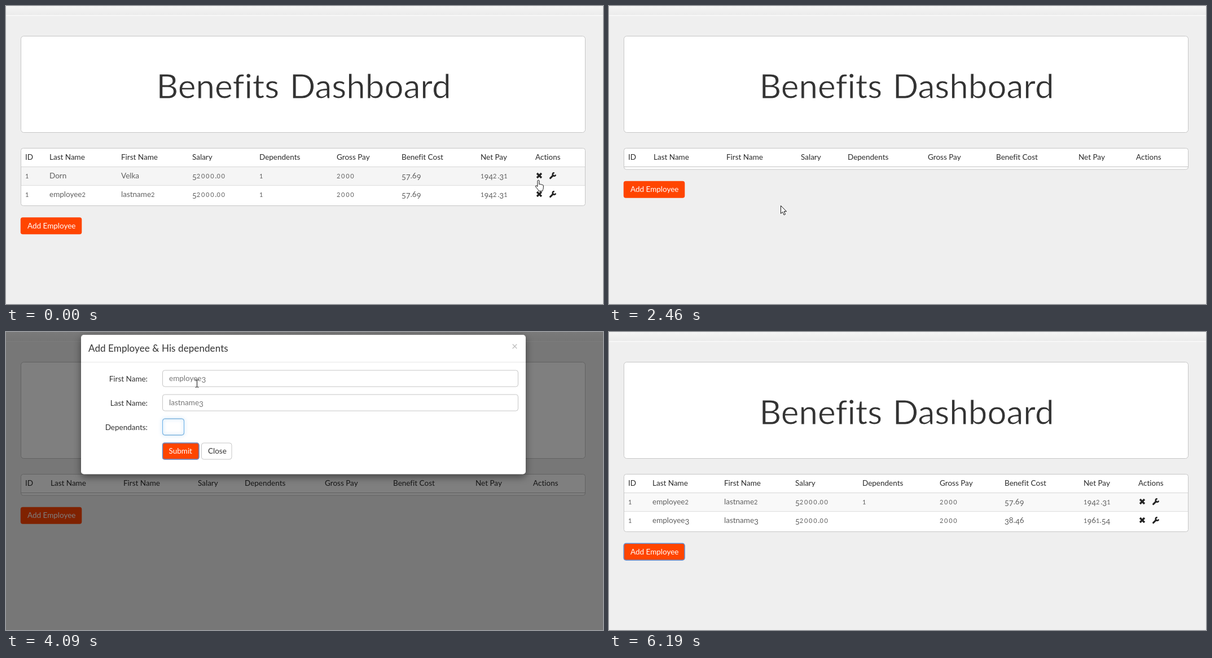
An HTML page for the animation above (6570 ms loop, 1058 px wide and 529 px high).

```html
<!DOCTYPE html>
<html lang="en">
<head>
<meta charset="utf-8">
<title>Benefits Dashboard</title>
<style>
  html, body { margin: 0; width: 100%; height: 100%; overflow: hidden; background: #efefef; }
  svg { display: block; width: 1058px; height: 529px; }
  text { font: 13.5px Lato, "Open Sans", sans-serif; fill: #333; white-space: pre; font-variant-ligatures: none; }
  .title { font-size: 60px; word-spacing: 3px; text-anchor: middle; stroke: #fff; stroke-width: .9px; }
  .heading { font-size: 17px; letter-spacing: .1px; }
  .close { font-size: 19px; fill: #bbb; }
  .head { fill: #2b2b2b; }
  .cell { fill: #606060; }
  .low { baseline-shift: -3px; }
  .mid { font-size: 11px; letter-spacing: 1.7px; }
  .one { font-size: 11px; }
  .light { fill: #fff; }
  .label { text-anchor: end; }
  .typed { fill: #777; }
  .box { fill: #fff; stroke: #c6c6c6; }
  .rule { stroke: #ddd; }
  .fill { fill: #ff4500; }
  .ring { fill: none; stroke: #5b93dc; stroke-width: 1.5; }
  .glow { fill: none; stroke: #66afe9; filter: drop-shadow(0 0 3px #66afe9); }
</style>
</head>
<body>
<svg id="stage" viewBox="0 0 1058 529"></svg>
<script>
const LOOP = 6570;
// bursts of change: first, last, number of steps
const BURSTS = [
  [100, 320, 4], [850, 1470, 9], [1550, 2020, 7], [2300, 2930, 9], [3010, 3620, 9],
  [3720, 3790, 2], [4090, 4730, 9], [5330, 5960, 9], [6030, 6190, 3]
];
// pointer path: time, x, y
const PATH = [
  [30, 943, 308], [320, 943, 297], [780, 943, 297], [1120, 690, 345], [1470, 394, 375],
  [2225, 394, 375], [2560, 265, 345], [2850, 128, 320], [3010, 128, 320], [3162, 225, 238],
  [3240, 246, 233], [3320, 246, 233], [3470, 292, 150], [3620, 338, 91], [4250, 338, 91],
  [4330, 336, 90], [5255, 336, 90], [5500, 366, 150], [5700, 335, 215], [5830, 315, 250],
  [5960, 337, 279], [6030, 530, 390], [6110, 735, 503]
];
const HEADS = ["ID", "Last Name", "First Name", "Salary", "Dependents",
  "Gross Pay", "Benefit Cost", "Net Pay", "Actions"];
const WIDE = [34, 77, 204, 330, 449, 586, 701, 841, 938];
const BARE = [34, 79, 208, 340, 423, 565, 686, 832, 934];
const person = (last, first, deps, cost, net) =>
  ["1", last, first, "52000.00", deps, "2000", cost, net];
const FIRST = person("Dorn", "Velka", "1", "57.69", "1942.31");
const SECOND = person("employee2", "lastname2", "1", "57.69", "1942.31");
const THIRD = person("employee3", "lastname3", "", "38.46", "1961.54");

const text = (x, y, s, cls = "") => `<text x="${x}" y="${y}" class="${cls}">${s}</text>`;
const rect = (x, y, w, h, cls, r = 4, more = "") =>
  `<rect x="${x}" y="${y}" width="${w}" height="${h}" rx="${r}" class="${cls}" ${more}/>`;
const line = (x1, x2, y, more = "") =>
  `<line class="rule" x1="${x1}" x2="${x2}" y1="${y}" y2="${y}" ${more}/>`;
const group = (id, inner, more = "") => `<g id="${id}" ${more}>${inner}</g>`;

// old-style figures: short 0 1 2, hanging 3 4 5 7 9
const figures = s => s.replace(/\d/g, d => {
  const cls = d === "1" ? "one" : "02".includes(d) ? "mid" : "34579".includes(d) ? "low" : "";
  return cls ? `<tspan class="${cls}">${d}</tspan>` : d;
});

const icons = y => `
  <path d="M941 ${y - 4}l8 8m0-8l-8 8" stroke="#222" stroke-width="3.2"/>
  <path d="M964.6 ${y + 4.6}l5-5" stroke="#222" stroke-width="3" stroke-linecap="round"/>
  <path d="M971.8 ${y - 4.6}a2.7 2.7 0 1 0 2.2 3.2" fill="none" stroke="#222" stroke-width="2.4"/>`;

function table(id, cols, rows, shift = 0, stripe = "#f9f9f9") {
  const top = 285 + shift;
  const bottom = rows.length ? 354.5 + shift : 290;
  const edge = rows.length ? "#d6d6d6" : "#c0c0c0";
  let s = rect(26.5, 252.5, 1000, bottom - 252.5, "box");
  if (rows.length) s += rect(27, top + 1, 999, 32, "", 0, `fill="${stripe}"`);
  s += line(27, 1026, top + .5 - shift / 4, `style="stroke:${edge};stroke-width:${1 + shift / 2}"`);
  HEADS.forEach((h, i) => s += text(cols[i], 273 + shift / 2, h, "head"));
  rows.forEach((row, r) => {
    const y = top + 21 + r * 33;
    if (r) s += line(27, 1026, top + 33.5);
    row.forEach((v, i) => s += text(cols[i], y, figures(v), "cell"));
    s += icons(y - 5);
  });
  const by = bottom + 20.8;
  s += rect(25.8, by, 108.5, 30, "fill") + text(38, by + 19.4, "Add Employee", "light");
  s += rect(26.3, by, 107.7, 29.7, "ring");
  return group(id, s);
}

const field = (y, w, label) =>
  text(251, y + 19.5, label, "label") + rect(277.5, y, w, 29, "box");

const modal = rect(133, 5, 788, 247.5, "", 5,
    'fill="#fff" style="filter:drop-shadow(0 5px 7px rgba(0,0,0,.45))"')
  + text(146, 35, "Add Employee &amp; His dependents", "heading")
  + text(896, 32, "×", "close")
  + line(133, 921, 53.5, 'style="stroke:#e5e5e5"')
  + field(68, 630, "First Name:") + field(111, 630, "Last Name:") + field(154, 38, "Dependants:")
  + rect(277, 196.5, 65.3, 30, "fill") + text(288.5, 216, "Submit", "light")
  + rect(346.5, 197, 53.5, 29, "box") + text(358, 216, "Close")
  + group("focus", rect(277.5, 68, 630, 29, "glow"))
  + group("filled", text(289, 87, figures("employee3"), "typed")
    + text(289, 130, figures("lastname3"), "typed")
    + rect(277.5, 154, 38, 29, "glow") + rect(277.5, 197, 64.5, 29, "ring"));

const SPOKES = 13;
let spokes = "";
for (let k = 0; k < SPOKES; k++)
  spokes += `<line x1="42.5" x2="67" y1="0" y2="0" transform="rotate(${k * 360 / SPOKES})"/>`;

const pointers = group("arrow", '<path d="M0 0V14L3.2 11L5.6 16.4L8 15.3L5.6 10.2H10Z"/>')
  + group("hand", '<path transform="translate(-6)" d="M4.5 12V2.2a1.5 1.5 0 0 1 3 0V8.2c1-.9 2.4-.6 2.6.4c1-.7 2.3-.3 2.5.6c1-.5 2.2 0 2.2 1.2V14c0 3-1.3 3.5-1.5 6H6.5C6.3 17.5 3 15 1.2 12.4c-1-1.6 1-2.6 2-1.5Z"/>')
  + group("beam", '<path fill="none" d="M-3-6.5h2.2L0-5.8L.8-6.5H3M0-5.8V5.8M-3 6.5h2.2L0 5.8L.8 6.5H3"/>');

document.getElementById("stage").innerHTML = `
  <defs><linearGradient id="bar" x2="0" y2="1">
    <stop stop-color="#f5f5f5"/><stop offset="1" stop-color="#ebebeb"/>
  </linearGradient></defs>
  <rect width="1058" height="529" fill="#efefef"/>
  <rect width="1058" height="16" fill="url(#bar)"/>
  <rect y="16" width="1058" height="1.5" fill="#fafafa"/>`
  + rect(26.5, 53.5, 1000, 171, "box", 5)
  + text(527.5, 163.5, "Benefits Dashboard", "title")
  + table("idle", WIDE, [FIRST, SECOND], 0, "#f5f5f5")
  + table("busy", WIDE, [FIRST, SECOND], 2)
  + table("empty", BARE, [])
  + table("full", WIDE, [SECOND, THIRD])
  + group("loader", spokes, 'transform="translate(527.5 394.8)" stroke="#000" stroke-width="12" stroke-linecap="round"')
  + '<rect id="shade" width="1058" height="529"/>'
  + group("modal", modal)
  + group("pointer", pointers, 'fill="#fff" stroke="#111"');

const $ = id => document.getElementById(id);
const show = (id, on) => $(id).style.display = on ? "" : "none";
const clamp = v => Math.min(1, Math.max(0, v));
const easeOut = p => 1 - (1 - p) ** 2;
const smooth = (a, b, v) => { const x = clamp((v - a) / (b - a)); return x * x * (3 - 2 * x); };
const bars = [...$("loader").children];
const rings = [...document.querySelectorAll("#empty .ring, #full .ring")];
document.querySelectorAll("#idle .ring, #busy .ring").forEach(r => r.remove());

function snap(t) {
  let at = 0;
  for (const [a, b, n] of BURSTS) {
    if (t < a) break;
    const gap = (b - a) / (n - 1);
    at = a + gap * Math.min(n - 1, Math.floor((t - a) / gap + .15));
  }
  return at;
}

function place(t) {
  const i = PATH.findIndex(p => p[0] > t);
  if (i === 0) return PATH[0].slice(1);
  if (i < 0) return PATH[PATH.length - 1].slice(1);
  const [a, x, y] = PATH[i - 1], [b, u, v] = PATH[i];
  const p = (t - a) / (b - a);
  return [x + (u - x) * p, y + (v - y) * p];
}

function draw(time) {
  const t = snap(time);
  const busy = t >= 850 && t < 2019;
  show("idle", t < 850);
  show("busy", busy);
  show("empty", t >= 2019 && t < 4330);
  show("full", t >= 4330);
  rings.forEach(r => r.style.opacity = +((t > 2925 && t < 3720) || t > 4725));

  show("loader", busy);
  const head = Math.round((t - 1620) / 77) + 11;
  bars.forEach((b, k) => {
    const lag = (head - k + SPOKES * 4) % SPOKES;
    b.style.opacity = .47 + .48 * (1 - smooth(3, 11, lag));
  });

  $("shade").style.opacity = .5 * (clamp((t - 2977) / 150) - clamp((t - 4520) / 150));
  const enter = t - 3112, leave = t - 4220;
  const alpha = clamp(enter / 150) - clamp(leave / 150);
  const rise = 59 * (1 - easeOut(clamp(enter / 300)) + easeOut(clamp(leave / 300)));
  show("modal", alpha > 0);
  $("modal").style.opacity = alpha;
  $("modal").setAttribute("transform", `translate(0 ${-rise})`);
  $("focus").style.opacity = t < 4090 ? clamp((t - 3650) / 140) : 0;
  show("filled", t >= 4090);

  const hand = t < 850 || (t > 2840 && t < 3010);
  const beam = t > 3615 && t < 4330;
  show("hand", hand);
  show("beam", beam);
  show("arrow", !hand && !beam);
  show("pointer", t < 6185);
  $("pointer").setAttribute("transform", `translate(${place(t).map(v => Math.round(v) + .5).join(" ")})`);
}

const start = performance.now();
function tick() {
  draw((performance.now() - start) % LOOP);
  requestAnimationFrame(tick);
}
tick();
</script>
</body>
</html>
```
